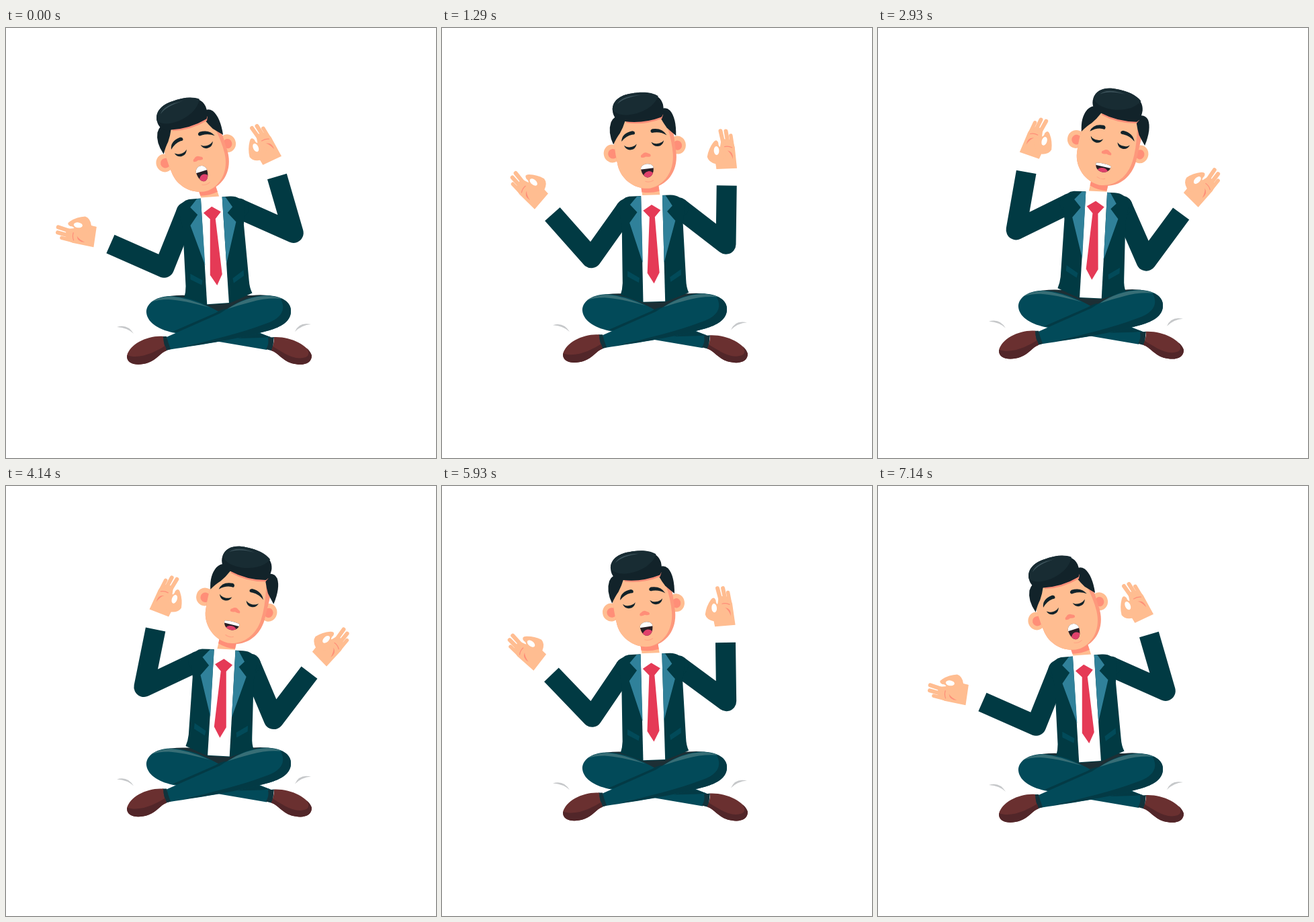
Write an HTML page with a canvas that moves like this. It is 640 px wide and 640 px high and loops after 7.21 s.

```html
<!DOCTYPE html>
<html lang="en">
<head>
<meta charset="utf-8">
<title>Meditating man</title>
<style>
html, body { margin: 0; width: 100%; height: 100%; overflow: hidden; background: #fff; }
canvas { display: block; width: 100vw; height: 100vh; }
</style>
</head>
<body>
<canvas id="stage" width="640" height="640"></canvas>
<script>
const ctx = document.getElementById('stage').getContext('2d');
const LOOP = 7210, STEPS = 101;
const RAD = Math.PI / 180;

const SKIN = '#ffbd91', BLUSH = '#ff8e78', SHADE = '#fd987c', HAIR = '#12232a', HAIR_LIGHT = '#182c33';
const JACKET = '#013a43', LAPEL = '#30819a', TROUSER = '#024a59', TROUSER_DARK = '#033a45';
const SHEEN = '#376e76', WAIST = '#1c2f35', TIE = '#e53a56', SHOE = '#6a3030', SHOE_DARK = '#522629';

function fill(color, d) {
  ctx.fillStyle = color;
  ctx.fill(new Path2D(d));
}

function stroke(color, width, d) {
  ctx.strokeStyle = color;
  ctx.lineWidth = width;
  ctx.stroke(new Path2D(d));
}

function oval(color, x, y, rx, ry) {
  ctx.fillStyle = color;
  ctx.beginPath();
  ctx.ellipse(x, y, rx, ry, 0, 0, 2 * Math.PI);
  ctx.fill();
}

// Runs draw() with the origin at x, y, turned by deg.
function at(x, y, deg, draw) {
  ctx.save();
  ctx.translate(x, y);
  ctx.rotate(deg * RAD);
  draw();
  ctx.restore();
}

function polar(p, deg, len) {
  return { x: p.x + len * Math.cos(deg * RAD), y: p.y + len * Math.sin(deg * RAD) };
}

function drawMarks() {
  fill('#c6c8ca', 'M165 445 Q181 440 190 455 Q181 446 165 445Z');
  fill('#c6c8ca', 'M430 452 Q436 437 454 441 Q440 442 430 452Z');
}

function drawWaist() {
  fill(WAIST, 'M230 402 Q248 397 270 398 L366 398 Q385 396 402 400 L322 426Z');
}

function drawLegs() {
  // back leg: left knee, right foot
  fill(TROUSER, 'M320 424 C296 410 270 399 244 399 C221 400 208 411 209 424 C211 440 230 450 252 454 L300 464 L388 479 L396 461 L366 449Z');
  fill(SHEEN, 'M216 408 Q226 400 246 399.5 Q272 402 303 416 Q264 405 242 404 Q226 404 216 408Z');
  fill(TROUSER_DARK, 'M248 452 L312 424 Q318 420 326 418 L330 424 L262 454Z');
  fill(TROUSER_DARK, 'M345 462 L372 453 L394 460 L380 461Z');
  // front leg: right knee, left foot
  fill(TROUSER, 'M239 460 L318 425 C340 411 358 399 386 398 C411 398 425 408 424 423 C423 437 409 445 392 450 C345 463 300 470 241 479Z');
  fill(TROUSER_DARK, 'M408 402 C420 406 425 414 424 423 C423 437 409 445 392 450 C350 462 305 469 262 475 C308 464 350 454 384 441 C408 434 419 420 408 402Z');
  fill(SHEEN, 'M330 418 Q357 400 388 398.5 Q402 399 411 403 Q388 401 364 408 Q348 412 330 418Z');
  // ankles
  fill('#11333c', 'M233 459 L239 459 Q241 468 245 478 L236 481Z');
  fill('#11333c', 'M390 461 L399 460 Q397 472 398 481 L387 478Q392 470 390 461Z');
  // shoes
  fill(SHOE, 'M234 459 C212 457 184 470 180 488 C179 502 198 503 212 498 C225 493 229 484 239 480 Q234 470 234 459Z');
  fill(SHOE_DARK, 'M180 487 C179 502 198 503 212 498 C225 493 229 484 239 480 L237 473 C224 481 200 494 180 487Z');
  fill(SHOE, 'M399 460 C424 459 450 472 455 488 C455 501 440 503 425 499 C410 494 406 484 395 480 Q399 470 399 460Z');
  fill(SHOE_DARK, 'M455 487 C455 501 440 503 425 499 C410 494 406 484 395 480 L397 474 C410 481 428 496 446 490 Q454 486 447 476 Q453 481 455 487Z');
}

function drawHand(p, deg, flip) {
  at(p.x, p.y, deg + 90, () => {
    ctx.scale(flip, 1);
    fill(SKIN, 'M-15 0 L-13 -32 L-10 -42 L6 -45 L8.5 -34 L18 -18 Q15 -8 15.5 0Z');
    stroke(SKIN, 5.5, 'M-10 -30 L-8 -49');
    stroke(SKIN, 6, 'M-4 -32 L-1 -56');
    stroke(SKIN, 6, 'M3 -34 L7 -56.5');
    // thumb and index closing the ring
    fill(SKIN, 'M15.5 0 L16.5 -8 Q27 -11 28.5 -19 Q26 -31 18.5 -40 Q13.5 -46 11 -39 Q11.5 -34 8 -32 L0 -20Z');
    ctx.fillStyle = '#fff';
    oval('#fff', 14.3, -27.6, 3.9, 6.6);
    stroke(BLUSH, 1.2, 'M-9 -31 Q-4 -34 2 -33');
    fill(BLUSH, 'M-2 -27 Q-11 -25 -9.5 -14 Q-7 -23 -2 -27Z');
  });
}

function drawArm(shoulder, upper, fore, bend, flip) {
  const elbow = polar(shoulder, upper, 89.2);
  const cuff = polar(elbow, fore, 87.3);
  ctx.strokeStyle = JACKET;
  ctx.lineWidth = 30;
  ctx.lineCap = 'butt';
  ctx.beginPath();
  ctx.moveTo(shoulder.x, shoulder.y);
  ctx.lineTo(elbow.x, elbow.y);
  ctx.lineTo(cuff.x, cuff.y);
  ctx.stroke();
  ctx.lineCap = 'round';
  oval(JACKET, shoulder.x, shoulder.y, 15, 15);
  drawHand(polar(cuff, fore, 25), fore + bend, flip);
}

function drawTorso() {
  fill(JACKET, 'M-15 -165 L-33 -164.6 Q-44 -163.5 -49 -150 L-45 -122 L-46.5 -36 Q-47 -27 -50 -19 L-17 -6 L16 -6 L51.5 -19 Q48 -27 48 -38 L46 -122 L50 -150 Q44 -165 28 -165Z');
  fill('#fff', 'M-15.2 -166 L16.6 -166 L16 -7 L-16.7 -7Z');
  fill(LAPEL, 'M-15.2 -164.5 L-21 -164.5 L-31.8 -152.5 L-21.6 -140.8 L-33.4 -125.5 L-15.6 -65Z');
  fill(LAPEL, 'M16.6 -165 L21.5 -164.5 L31 -149 L23 -140.8 L34.8 -126.5 L16.2 -65Z');
  fill(TIE, 'M0.2 -151.5 L13.3 -143 L4.5 -133 L8.8 -50 L0.2 -34 L-9.2 -50 L-3.5 -133 L-12.7 -143Z');
  fill(TROUSER, 'M-38.5 -54 L-21 -43 L-22.5 -36 L-39 -45.5Z');
  fill(TROUSER, 'M24 -43 L41 -54 L41 -45.5 L25 -35.5Z');
}

function drawNeck() {
  fill(SKIN, 'M-12.5 -35 L13.5 -35 L14 0 L-12 0Z');
  fill(BLUSH, 'M-12.5 -35 L13.5 -35 L13.7 -13 Q0 -11 -12.4 -15Z');
}

function drawMouth(e) {
  const w = 8.4 + 3.4 * e, top = -57.5 + 6.5 * e, low = -33.7 - 5.5 * e;
  const corner = -50, arch = corner + (top - corner) * 1.33, bowl = corner + (low - corner) * 1.33;
  const shape = new Path2D(`M${-w} ${corner} C${-w * 0.8} ${arch} ${w * 0.8} ${arch} ${w} ${corner} C${w} ${bowl} ${-w} ${bowl} ${-w} ${corner}Z`);
  ctx.save();
  ctx.translate(0.2, 0);
  ctx.clip(shape);
  fill('#2a2027', 'M-20 -70 H20 V-25 H-20Z');
  ctx.fillStyle = '#fff';
  ctx.fillRect(-20, -70, 40, 21 + 2.2 * e);
  oval('#e0416b', 1, low + 1, 9, 11.5 - 4.5 * e);
  ctx.restore();
}

function drawFace(e) {
  ctx.save();
  ctx.translate(2.4 * e - 1.2, 0);
  for (const x of [-19.6, 21.2]) {
    at(x, -84, 0, () => fill(HAIR, 'M-9.5 -3 Q-8 -2 -6.5 -0.8 Q0 2 6.5 -0.8 Q8 -2 9.5 -3 Q7 4.6 0 4.6 Q-7 4.6 -9.5 -3Z'));
  }
  fill(HAIR, 'M-32 -93.5 Q-30 -106 -14 -107 Q-9.5 -106 -11 -102 Q-12 -101 -15 -101.5 Q-24 -101 -32 -93.5Z');
  fill(HAIR, 'M36 -94 Q31 -106 16 -106 Q11.5 -104.5 13.5 -101 Q15 -100 18 -100.5 Q28 -100.5 36 -94Z');
  ctx.restore();
  fill(BLUSH, 'M-6.5 -66 Q-8 -69 -4.5 -70.5 Q0 -75 5 -70.5 Q9 -69 7.5 -66 Q4 -65 0.5 -66.5 Q-3 -65 -6.5 -66Z');
  drawMouth(e);
  stroke('#ffa585', 1.1, 'M-5 -30 Q1 -27 7 -30');
}

function drawHead(e) {
  const back = 1 - e;
  oval(SKIN, -48.5, -77.5, 12.7, 13.5);
  oval(SKIN, 49.5, -77.5, 12.3, 13.5);
  oval(BLUSH, -47.5, -77, 7.3, 7.3);
  oval(BLUSH, 49.5, -77, 6.5, 7.2);
  fill(SHADE, 'M-43.5 -100 C-44 -85 -44 -72 -42.5 -58 C-40 -37 -21 -19 1 -19 C26 -19 44.5 -38 46 -65 L46 -108 L35 -128 L-25 -128Z');
  fill(SKIN, 'M-43.5 -100 C-44 -85 -44 -72 -42.5 -58 C-40 -37 -21 -19 1 -19 C22 -21 39 -38 41 -65 Q42 -84 38 -106 L35 -128 L-25 -128Z');
  // side hair, sliding a little as the head turns
  at(7 * e - 5, 0, 0, () => fill(HAIR, 'M34 -133 Q42 -137 48 -130 Q56 -118 52 -91.5 Q46 -98 40 -105 Q36 -112 32.5 -121Z'));
  at(-3.2 * back, 0, 0, () => fill(HAIR, 'M-24 -132 Q-36 -134 -42 -124 Q-49 -110 -42.8 -90.5 Q-37 -100 -31 -106 Q-25 -114 -20.5 -124Z'));
  // quiff
  at(-3.7 * back, 2.2 * back, 0, () => {
    fill(BLUSH, 'M-20 -127 L37 -127 L34 -121 Q6 -114.5 -19 -121.5Z');
    fill(HAIR, 'M-37 -143 C-36 -156 -24 -164 -6 -164 C14 -165 36 -160 38.5 -142 C39 -134 38 -127 34 -123.5 Q6 -117 -21 -124 C-32 -124 -38 -133 -37 -143Z');
    fill(HAIR_LIGHT, 'M-37 -143 C-36 -156 -24 -164 -6 -164 C10 -165 25 -162 33 -155 C26 -140 4 -132 -14 -133 Q-29 -133 -37 -143Z');
    fill('#3d545c', 'M-29 -151 Q-20 -163 8 -159.5 Q-17 -160 -29 -151Z');
  });
  drawFace(e);
}

function render(step) {
  const u = Math.min(step, 100 - step) / 50;
  const e = u * u * (3 - 2 * u);
  const hip = { x: 316.4, y: 417 - 9 * e };
  const lean = -3.94 + 7.4 * e;
  const onTorso = (x, y) => polar(hip, lean + Math.atan2(y, x) / RAD, Math.hypot(x, y));
  const neck = onTorso(0, -157);
  const tilt = -17.4 + 33.5 * e;

  ctx.fillStyle = '#fff';
  ctx.fillRect(0, 0, 640, 640);
  ctx.lineJoin = ctx.lineCap = 'round';

  at(0, -9 * e, 0, () => { drawMarks(); drawWaist(); });
  at(neck.x, neck.y, tilt, drawNeck);
  drawArm(onTorso(-38, -146), 111.8 + 46 * e, 203.8 + 83.3 * e, -15.5 + 27 * e, 1);
  drawArm(onTorso(40, -146), 24 + 46.3 * e, 253.8 + 57.5 * e, -9 + 19 * e, -1);
  at(hip.x, hip.y, lean, drawTorso);
  at(0, -9 * e, 0, drawLegs);
  at(neck.x, neck.y, tilt, () => drawHead(e));
}

const start = performance.now();
function tick() {
  const t = (performance.now() - start) % LOOP;
  render(Math.min(Math.floor((t + 4) / LOOP * STEPS), 100));
  requestAnimationFrame(tick);
}
tick();
</script>
</body>
</html>
```
